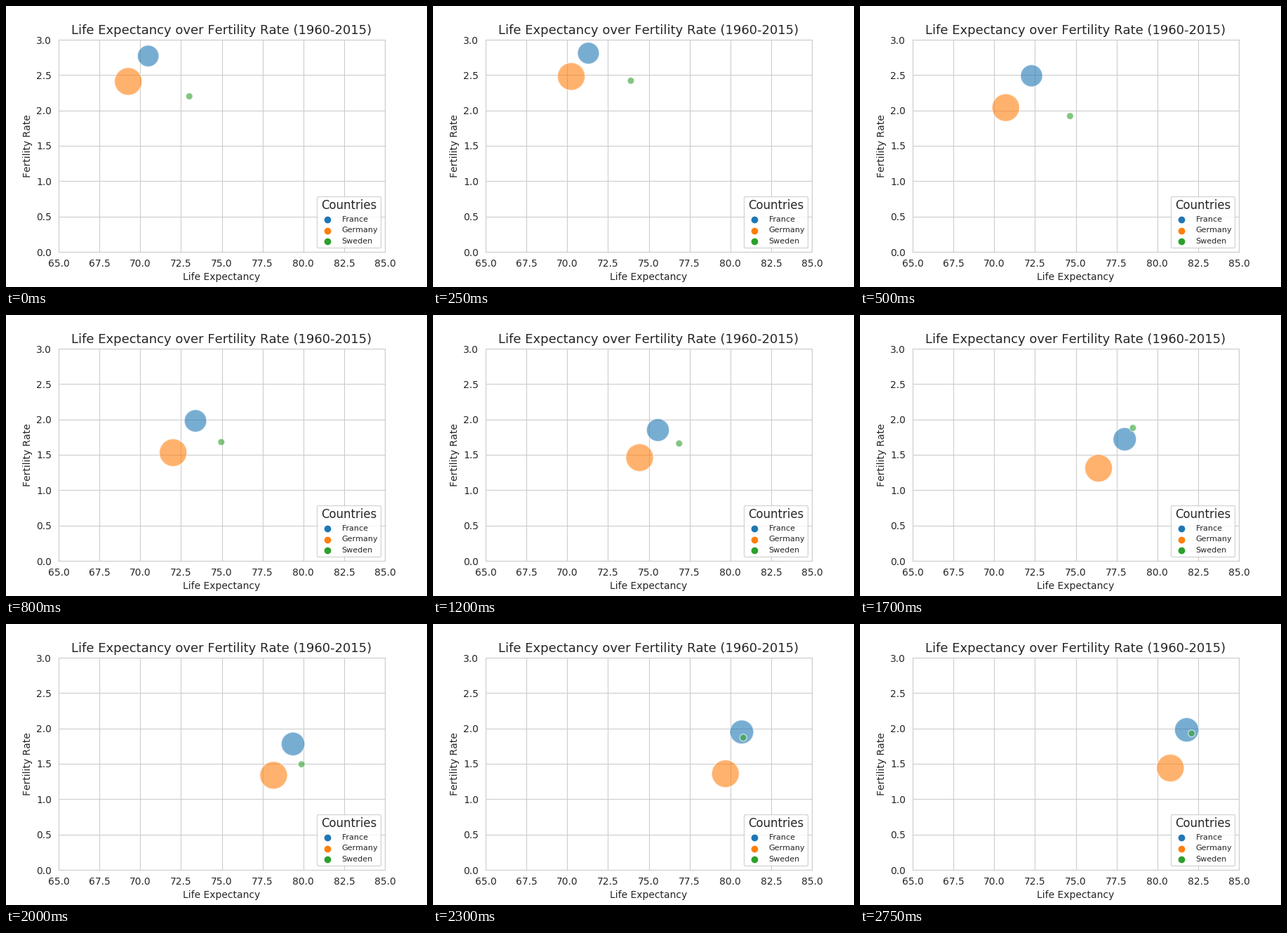
Recreate the animation shown at these times as a matplotlib script. Size 600 by 400 pixels, loop 2800 ms.

```python
import matplotlib.pyplot as plt
import numpy as np
from matplotlib.animation import FuncAnimation

FIRST, LAST = 1960, 2015
COLORS = {"France": "tab:blue", "Germany": "tab:orange", "Sweden": "tab:green"}
MIN_SIZE, MAX_SIZE = 50, 800

# A few key years; smooth curves run between them.
KEY_YEARS = np.array([1960, 1965, 1970, 1976, 1984, 1990, 1994, 1998, 2006, 2015])
LIFE = {
    "France": [70.49, 71.3, 72.29, 73.39, 75.56, 77.1, 78.0, 78.9, 80.7, 81.8],
    "Germany": [69.27, 70.25, 70.71, 72.02, 74.44, 75.4, 76.4, 77.6, 79.7, 80.8],
    "Sweden": [73.01, 73.9, 74.65, 74.97, 76.86, 77.75, 78.5, 79.5, 80.79, 82.1],
}
BIRTHS = {
    "France": [2.77, 2.81, 2.49, 1.98, 1.85, 1.78, 1.72, 1.74, 1.95, 1.98],
    "Germany": [2.41, 2.48, 2.04, 1.53, 1.46, 1.37, 1.31, 1.33, 1.36, 1.44],
    "Sweden": [2.2, 2.42, 1.92, 1.68, 1.66, 2.13, 1.88, 1.5, 1.87, 1.93],
}


def smooth(year, values):
    """Cubic Hermite curve through the key years."""
    values = np.asarray(values)
    slopes = np.gradient(values, KEY_YEARS)
    k = min(np.searchsorted(KEY_YEARS, year, side="right"), len(KEY_YEARS) - 1) - 1
    span = KEY_YEARS[k + 1] - KEY_YEARS[k]
    t = (year - KEY_YEARS[k]) / span
    ease = t * t * (3 - 2 * t)
    bend = t * (1 - t) * ((1 - t) * slopes[k] - t * slopes[k + 1])
    return values[k] + ease * (values[k + 1] - values[k]) + span * bend


def positions(year):
    return [(smooth(year, LIFE[name]), smooth(year, BIRTHS[name]))
            for name in COLORS]


def bubble_sizes(year):
    # France grows steadily relative to the largest and smallest country.
    share = 0.581 + 0.178 * (year - FIRST) / (LAST - FIRST)
    return [MIN_SIZE + share * (MAX_SIZE - MIN_SIZE), MAX_SIZE, MIN_SIZE]


plt.rcParams.update({
    "font.family": "DejaVu Sans", "font.size": 10,
    "text.kerning_factor": 6,
    "text.color": "0.15", "axes.labelcolor": "0.15",
    "xtick.color": "0.15", "ytick.color": "0.15",
    "axes.edgecolor": "0.8", "grid.color": "0.8",
    "axes.axisbelow": True,
})

fig, ax = plt.subplots(figsize=(6, 4), dpi=100)
fig.subplots_adjust(left=0.125, right=0.9, bottom=0.125, top=0.88)
ax.set(xlim=(65, 85), ylim=(0, 3),
       xticks=np.arange(65, 86, 2.5), yticks=np.arange(0, 3.1, 0.5),
       xlabel="Life Expectancy", ylabel="Fertility Rate")
ax.set_title("Life Expectancy over Fertility Rate (1960-2015)", fontsize=13)
ax.grid(True)
ax.tick_params(bottom=False, left=False)

bubbles = ax.scatter(*zip(*positions(FIRST)), c=list(COLORS.values()),
                     edgecolors="white", alpha=0.6)
keys = [ax.scatter([], [], s=36, color=color, linewidths=1, label=name)
        for name, color in COLORS.items()]
ax.legend(handles=keys, title="Countries", loc="lower right",
          fontsize=8, title_fontsize=11.9)


def update(i):
    year = FIRST + i
    sizes = bubble_sizes(year)
    bubbles.set_offsets(positions(year))
    bubbles.set_sizes(sizes)
    bubbles.set_linewidths([0.08 * np.sqrt(np.percentile(sizes, 10))])
    return [bubbles]


anim = FuncAnimation(fig, update, frames=LAST - FIRST + 1, interval=50,
                     repeat=True, repeat_delay=0)
plt.show()
```
